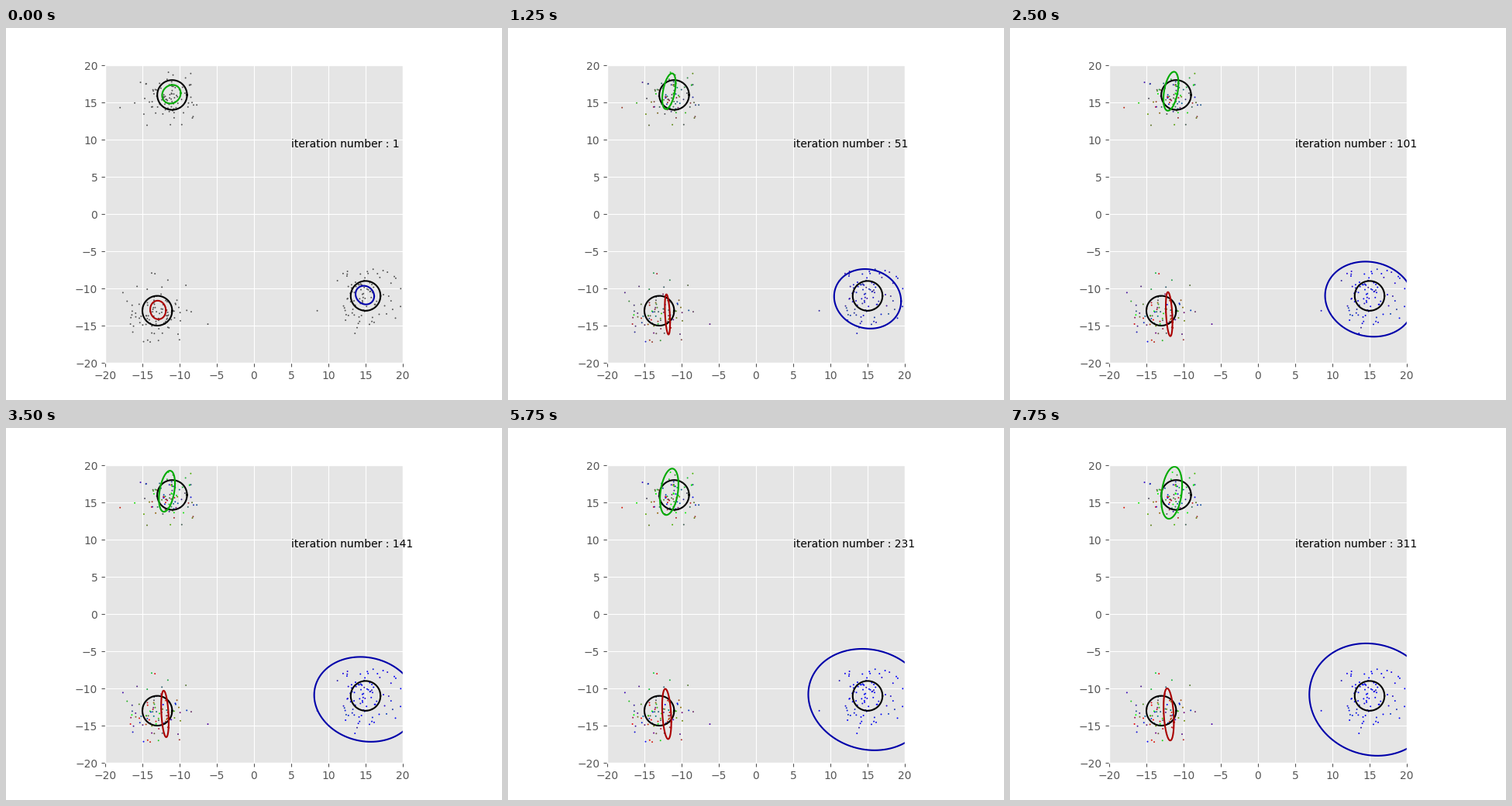
A matplotlib script that plays this animation: 640x480 px, repeating every 8000 ms.

```python
import numpy as np
import matplotlib.pyplot as plt
from matplotlib.animation import FuncAnimation

plt.style.use("ggplot")
plt.rcParams["font.family"] = "DejaVu Sans"

FRAMES, INTERVAL = 32, 250
STEP = 10            # iterations per frame
SAMPLES = 95         # samples per cluster
rng = np.random.default_rng(7)
theta = np.linspace(0, 2 * np.pi, 121)

# Ellipse poses in data units: centre x, y, half width, half height, tilt.
KEYS = [0, 5, 19, 31]
CLUSTERS = [
    dict(center=(-11, 16), stray=(-18, 14.3), color="#00aa00",
         bias=(0, 1.3, .2), noise=1.8,
         poses=[(-11.1, 16.1, 1.25, 1.25, .12), (-11.7, 16.5, .9, 2.4, .45),
                (-11.7, 16.5, 1.15, 2.9, .35), (-11.6, 16.3, 1.4, 3.5, .27)]),
    dict(center=(-13, -13), stray=(-6.2, -14.8), color="#aa0000",
         bias=(.6, .4, 0), noise=1.8,
         poses=[(-12.9, -12.9, 1.05, 1.25, -.05), (-11.9, -13.5, .35, 2.7, -.4),
                (-12, -13.4, .57, 3.3, -.32), (-12, -13.5, .69, 3.5, -.3)]),
    dict(center=(15, -11), stray=(8.5, -13), color="#0000aa",
         bias=(0, 0, 4), noise=1,
         poses=[(14.9, -10.9, 1.25, 1.25, -.12), (15, -11.4, 4.5, 4, -.08),
                (15, -11.5, 7.9, 6.4, -.11), (15.3, -11.5, 8.4, 7.55, -.09)]),
]


def cluster(center, stray, bias, noise, **_):
    """Sample positions and the class scores they drift towards."""
    offsets = rng.normal(0, 2, (2 * SAMPLES, 2))
    offsets = offsets[np.hypot(*offsets.T) < 5.4][:SAMPLES]
    pts = np.vstack([offsets + center, stray])
    return pts, rng.normal(bias, noise, (len(pts), 3))


def outline(poses, k):
    """Ellipse at frame k; growth slows like a square root."""
    cx, cy, a, b, tilt = (np.interp(np.sqrt(k), np.sqrt(KEYS), values)
                          for values in zip(*poses))
    return (cx + a * np.cos(theta),
            cy + b * np.sin(theta + np.arcsin(tilt)))


def shares(k):
    """Class shares of every sample, used directly as RGB."""
    e = np.exp(scores * (1 - np.exp(-k / 9)))
    return e / e.sum(axis=1, keepdims=True)


points, scores = map(np.vstack, zip(*(cluster(**c) for c in CLUSTERS)))

fig = plt.figure(figsize=(6.4, 4.8), dpi=100, facecolor="white")
ax = fig.add_axes([.2, .1, .6, .8])
ax.set(xlim=(-20, 20), ylim=(-20, 20),
       xticks=range(-20, 21, 5), yticks=range(-20, 21, 5))

dots = ax.scatter(*points.T, s=2, linewidths=0, c=shares(0), zorder=1.5)
rings = []
for c in CLUSTERS:
    cx, cy = c["center"]
    ax.plot(cx + 2 * np.cos(theta), cy + 2 * np.sin(theta), "k", lw=1.5)
    rings += ax.plot([], [], color=c["color"], lw=1.5)
label = ax.text(5, 9, "", fontsize=10, color="black")


def draw(k):
    for ring, c in zip(rings, CLUSTERS):
        ring.set_data(*outline(c["poses"], k))
    dots.set_facecolor(shares(k))
    label.set_text(f"iteration number : {1 + STEP * k}")
    return [*rings, dots, label]


anim = FuncAnimation(fig, draw, frames=FRAMES, interval=INTERVAL, repeat=True)
plt.show()
```
